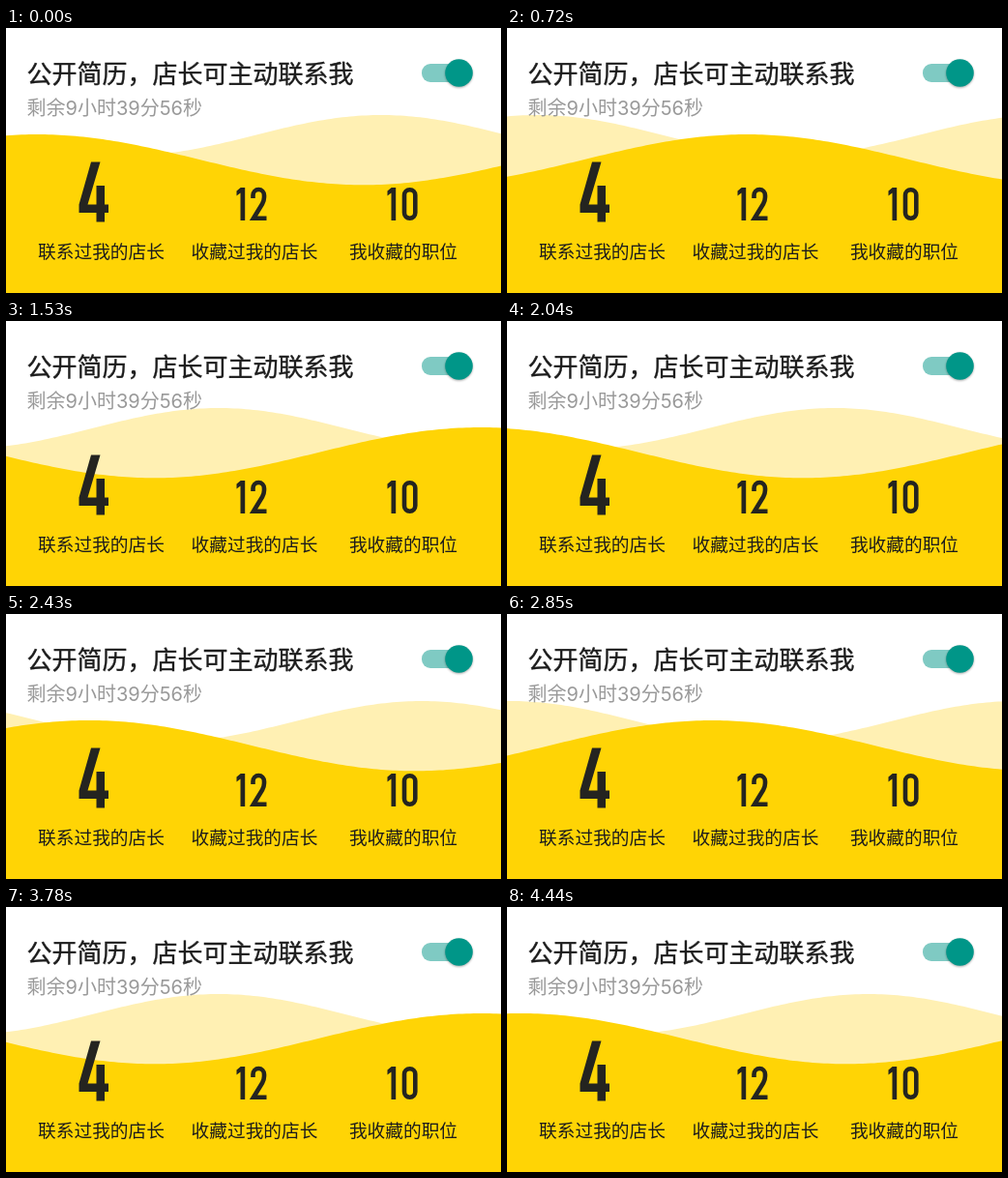
These frames come from a looping animation (512 px wide and 274 px high, 4470 ms). An HTML page:

```html
<!DOCTYPE html>
<html lang="zh-CN">
<head>
<meta charset="utf-8">
<style>
  html, body { margin: 0; width: 100%; height: 100%; overflow: hidden; background: #fff; }
  svg { display: block; width: 512px; height: 274px; }
  text { font-family: Inter, "Noto Sans CJK SC", "Noto Sans CJK", sans-serif; fill: #1c1c1c; }
  .title { font-size: 26px; stroke: #1c1c1c; stroke-width: .35px; }
  .note { font-size: 20px; fill: #999; }
  .label { font-size: 18.7px; text-anchor: middle; }
  .digits { fill: #242420; }
  .line { fill: none; stroke: #242420; stroke-width: 4.6; }
  .thumb { fill: #009688; filter: drop-shadow(0 1.5px 1.2px #0005); }
</style>
</head>
<body>
<svg viewBox="0 0 512 274">
  <path id="back" fill="#fff0b3"/>
  <path id="front" fill="#ffd405"/>

  <text class="title" x="21.5" y="57">公开简历，店长可主动联系我</text>
  <text class="note" x="21.5" y="89.5">剩余9小时39分56秒</text>
  <rect x="430" y="37" width="50" height="19" rx="9" fill="#7fcac3"/>
  <circle class="thumb" cx="468.5" cy="46.5" r="14.3"/>

  <g role="img" aria-label="4">
    <path class="digits" d="M88 138.500H97.500L84.500 182.500H106V191H75.500V182.500ZM93.500 163H102V200.500H93.500Z"/>
  </g>
  <g role="img" aria-label="12">
    <path id="one" class="digits" d="M242.700 165H247.200V199H242.500V170.500L238.500 173.500V168.500Z"/>
    <path class="line" d="M255.500 176V173A5.700 5.900 0 0 1 267 173V175Q267 178.500 265 182L256 196.700H269.500"/>
  </g>
  <g role="img" aria-label="10">
    <use href="#one" x="156"/>
    <rect class="line" x="412" y="167.200" width="11.300" height="29.500" rx="5.600"/>
  </g>

  <text class="label" x="98.500" y="237.600">联系过我的店长</text>
  <text class="label" x="257" y="237.600">收藏过我的店长</text>
  <text class="label" x="411" y="237.600">我收藏的职位</text>
</svg>
<script>
const LOOP = 4470, STEP = 30, PERIOD = 2250;
const waves = [
  { id: 'back', top: 90, height: 42, length: 525, crest: 388 },
  { id: 'front', top: 110, height: 52.3, length: 675, crest: 32 }
];

function wavePath({ top, height, length, crest }, phase) {
  let d = 'M0 274';
  for (let x = 0; x <= 512; x += 4) {
    const angle = 2 * Math.PI * ((x - crest) / length - phase);
    d += `L${x} ${(top + height * (1 - Math.cos(angle)) / 2).toFixed(2)}`;
  }
  return d + 'V274Z';
}

function draw() {
  const time = Math.floor(performance.now() % LOOP / STEP) * STEP;
  for (const wave of waves) {
    document.getElementById(wave.id).setAttribute('d', wavePath(wave, time / PERIOD));
  }
  requestAnimationFrame(draw);
}
draw();
</script>
</body>
</html>
```
